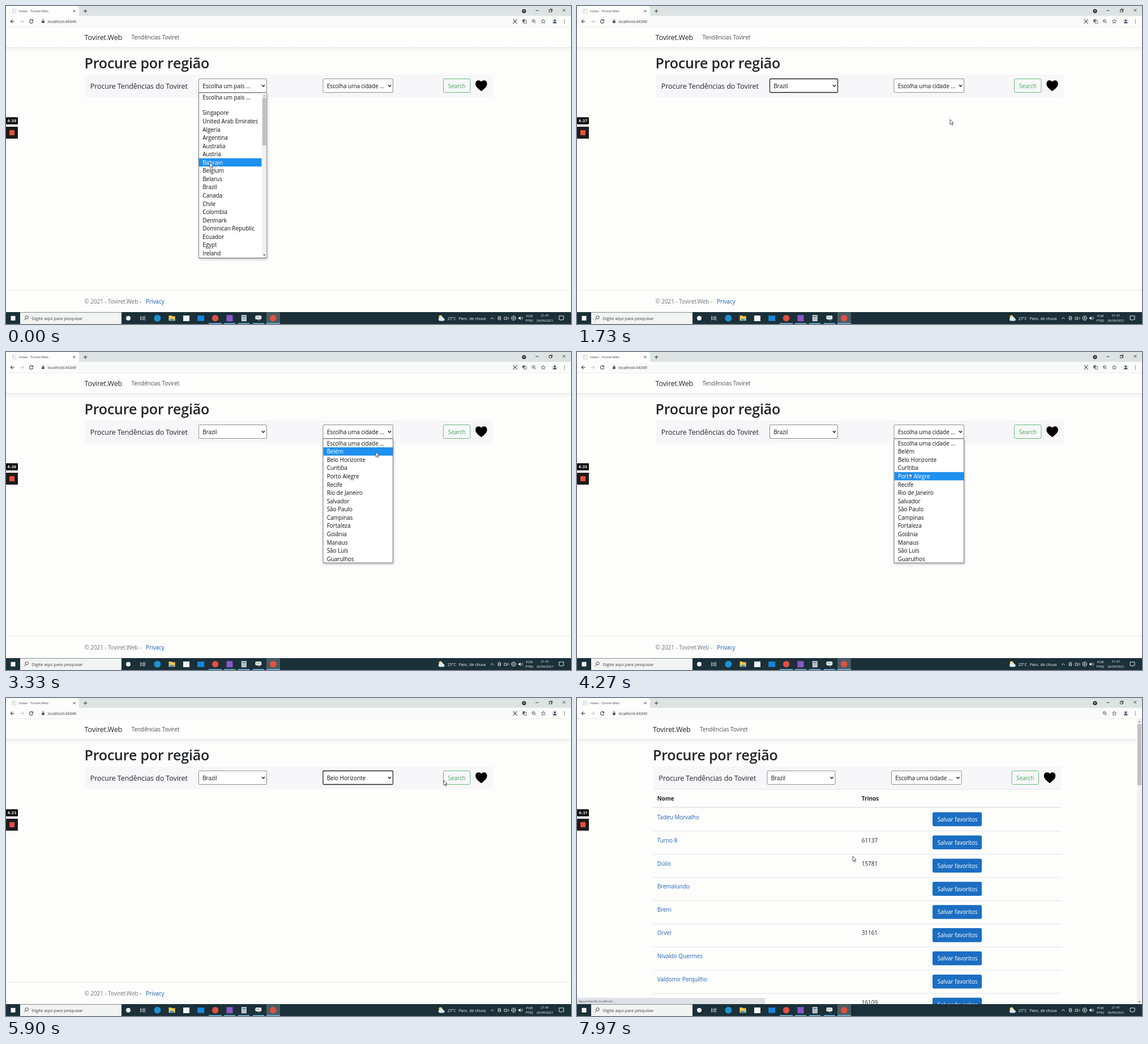
These frames come from a looping animation (998x561 px, 8000 ms). An HTML page:

```html
<!DOCTYPE html>
<html lang="pt">
<head>
<meta charset="utf-8">
<title>Tendências</title>
<style>
html, body { margin: 0; width: 100%; height: 100%; overflow: hidden; background: #fdfdfb; }
svg { display: block; width: 100%; height: 100%; }
text { font-family: "Open Sans", "Noto Sans", sans-serif; letter-spacing: -.007em; white-space: pre; }
</style>
</head>
<body>
<svg id="stage" viewBox="0 0 998 561"></svg>
<script>
const NS = 'http://www.w3.org/2000/svg';
const LOOP = 8000, ROW = 14.56;
const stage = document.getElementById('stage');

function el(parent, tag, attrs = {}, content) {
  const node = document.createElementNS(NS, tag);
  for (const k in attrs) node.setAttribute(k, attrs[k]);
  if (content !== undefined) node.textContent = content;
  parent.appendChild(node);
  return node;
}
const group = (p, attrs) => el(p, 'g', attrs);
const rect = (p, x, y, width, height, fill, more) => el(p, 'rect', { x, y, width, height, fill, ...more });
const circle = (p, cx, cy, r, fill, more) => el(p, 'circle', { cx, cy, r, fill, ...more });
const line = (p, d, stroke, w = 1, more) =>
  el(p, 'path', { d, stroke, fill: 'none', 'stroke-width': w, ...more });
const shape = (p, d, fill, more) => el(p, 'path', { d, fill, ...more });
const text = (p, x, y, s, size, fill = '#212529', more) =>
  el(p, 'text', { x, y, 'font-size': (size * .962).toFixed(2), fill, ...more }, s);
const show = (node, on) => node.setAttribute('display', on ? 'inline' : 'none');
const setText = (node, s) => { if (node.textContent !== s) node.textContent = s; };

// Soft shadows
const defs = el(stage, 'defs');
const blur = el(defs, 'filter', { id: 'blur', x: '-10%', y: '-10%', width: '120%', height: '120%' });
el(blur, 'feGaussianBlur', { stdDeviation: 2 });
const fade = el(defs, 'linearGradient', { id: 'fade', x2: 0, y2: 1 });
el(fade, 'stop', { offset: 0, 'stop-color': '#000', 'stop-opacity': .045 });
el(fade, 'stop', { offset: 1, 'stop-color': '#000', 'stop-opacity': 0 });

// Page
rect(stage, 0, 0, 998, 561, '#fdfdfb');
rect(stage, 0, 37, 998, 36, '#fefefd');
rect(stage, 0, 73, 998, 8, 'url(#fade)');
rect(stage, 0, 72.7, 998, .8, '#dfe2e7');
const page = group(stage);
text(page, 138.5, 60, 'Toviret.Web', 13);
text(page, 221.5, 59.3, 'Tendências Toviret', 10.4, '#4d4f52');
text(page, 138.5, 110, 'Procure por região', 26, '#212529', { 'font-weight': 600, style: 'letter-spacing:-.007em' });
rect(page, 139, 121, 721, 40, '#f7f7f9');
text(page, 148.8, 146, 'Procure Tendências do Toviret', 13);

function makeSelect(x, w) {
  const box = rect(page, x, 128.5, w, 24, '#fff', { rx: 1.5 });
  const label = text(page, x + 6.7, 144.8, '', 10.4, '#111');
  line(page, `M${x + w - 8.6} 139.2l2.6 2.8 2.6 -2.8`, '#111', 1.3);
  return (s, focus) => {
    setText(label, s);
    box.setAttribute('stroke', focus ? '#222' : '#8e8e8e');
    box.setAttribute('stroke-width', focus ? 1.3 : 1);
  };
}
const country = makeSelect(340.5, 120);
const city = makeSelect(560, 123.5);

const ring = rect(page, 771.3, 127.3, 50, 26.5, 'none', { rx: 3, stroke: '#28a745', 'stroke-opacity': .5, 'stroke-width': 2 });
const button = rect(page, 772.5, 128.5, 47.5, 24, '#28a745', { rx: 2.2, stroke: '#68bc78' });
const buttonText = text(page, 780.8, 144.8, 'Search', 10.4);
shape(page, 'M839.5 150.2C832 145 829.3 141.3 829.3 137C829.3 130.6 836.5 129.4 839.5 133.6C842.5 129.4 849.7 130.6 849.7 137C849.7 141.3 847 145 839.5 150.2Z', '#000');

// Footer of the empty page
const footer = group(stage);
rect(footer, 0, 500.7, 998, .8, '#e4e4d9');
text(footer, 138.5, 525.2, '© 2021 - Toviret.Web - ', 10.4, '#6c757d');
text(footer, 247, 525.2, 'Privacy', 10.4, '#1761b0');

// Result table
const table = group(stage);
rect(table, 134.5, 160.6, 721, .9, '#dee2e6');
rect(table, 134.5, 192.4, 721, 1.2, '#d9dde1');
text(table, 141.8, 181, 'Nome', 10.4, '#212529', { 'font-weight': 700 });
text(table, 502.8, 181, 'Trinos', 10.4, '#212529', { 'font-weight': 700 });
const results = [
  ['Tadeu Morvalho'], ['Turno 8', 61137], ['Dúlio', 15781], ['Bremalundo'], ['Brem'],
  ['Orvel', 31161], ['Nivaldo Quermes'], ['Valdomir Perquilho'], ['', 16109]
];
results.forEach(([name, count], i) => {
  const y = 193 + i * 40.9;
  if (i) rect(table, 134.5, y + .4, 721, .9, '#dee2e6');
  text(table, 141.8, y + 20.7, name, 10.4, '#2364b4');
  if (count) text(table, 502.8, y + 20.7, count, 10.4);
  rect(table, 628, y + 8.6, 87, 24.6, '#1b6ec2', { rx: 2.4 });
  text(table, 636.8, y + 24.8, 'Salvar favoritos', 10.4, '#fff');
});
rect(table, 989, 37, 9, 503, '#f1f1f1');
rect(table, 990, 46, 7, 108, '#c1c1c1');
shape(table, 'M991.5 43l2 -2.5 2 2.5Z', '#777');
shape(table, 'M991.5 535l2 2.5 2 -2.5Z', '#555');

// Drop-down lists
function makeList(x, w, bottom, barWidth, items) {
  const g = group(stage);
  rect(g, x + 1, 155, w, bottom - 153, '#000', { opacity: .28, filter: 'url(#blur)' });
  rect(g, x, 153, w, bottom - 153, '#fff', { stroke: '#777' });
  const mark = rect(g, x + .5, 0, w - 1 - barWidth, ROW, '#1e90ef');
  const rows = items.map(([s, y]) => ({ y, label: text(g, x + 6.7, y + 3.8, s, 10.4, '#111') }));
  g.update = cy => {
    const hot = rows.find(r => Math.abs(r.y - cy) <= ROW / 2) || rows[0];
    mark.setAttribute('y', hot.y - ROW / 2 - .1);
    rows.forEach(r => r.label.setAttribute('fill', r === hot ? '#fff' : '#111'));
  };
  return g;
}
const countries = ('Singapore,United Arab Emirates,Algeria,Argentina,Australia,Austria,Bahrain,Belgium,Belarus,' +
  'Brazil,Canada,Chile,Colombia,Denmark,Dominican Republic,Ecuador,Egypt,Ireland').split(',');
const cities = ('Escolha uma cidade ...,Belém,Belo Horizonte,Curitiba,Porto Alegre,Recife,Rio de Janeiro,Salvador,' +
  'São Paulo,Campinas,Fortaleza,Goiânia,Manaus,São Luís,Guarulhos').split(',');
const countryList = makeList(340.5, 120, 444.5, 8.5,
  [['Escolha um país ...', 161], ...countries.map((s, i) => [s, 188.6 + i * ROW])]);
rect(countryList, 452, 153.5, 8.3, 290.5, '#f1f1f1');
rect(countryList, 452.8, 162, 6.8, 84, '#c1c1c1');
shape(countryList, 'M454.2 159.5l2 -2.5 2 2.5Z', '#888');
shape(countryList, 'M454.2 438.2l2 2.5 2 -2.5Z', '#444');
const cityList = makeList(560, 123.5, 372, 0, cities.map((s, i) => [s, 161 + i * ROW]));

// Browser frame
const frame = group(stage);
rect(frame, 0, 0, 998, 18, '#dde3e3');
shape(frame, 'M0 18V0H125Q129 1 129 5V18Z', '#fdfdfb');
rect(frame, 0, 17.5, 998, 19, '#fdfdfb');
rect(frame, 56, 20, 902, 14.5, '#f9fafa', { rx: 7.2 });
rect(frame, 0, 36.3, 998, .8, '#e6e7e6');
const favicon = group(frame);
rect(favicon, 11.5, 5.5, 6, 7, '#fff', { stroke: '#c3c9d0', 'stroke-width': .8 });
line(favicon, 'M12.5 7.5h1.5M12.5 9.3h3', '#8fa6bd', .7);
const spinner = line(frame, 'M14 5.5A3.5 3.5 0 0 1 17.5 9', '#b9bec6', 1);
text(frame, 22.8, 11.2, 'Index - Toviret.Web', 6.24, '#4a4d51');
line(frame, 'M118.7 7.2l3.6 3.6M122.3 7.2l-3.6 3.6', '#333', 1);
line(frame, 'M137 9h6.4M140.2 5.8v6.4', '#333', 1);
circle(frame, 915, 9, 3.6, '#2b2d30');
shape(frame, 'M913.4 8h3.2l-1.6 2.2Z', '#fff');
line(frame, 'M935.5 8h5', '#222', .9);
line(frame, 'M959.5 6.5h4v4h-4ZM960.8 6.5v-1.2h4v4h-1.2', '#222', .8);
line(frame, 'M983.3 5l5 5M988.3 5l-5 5', '#222', .8);
line(frame, 'M14.6 27.2H8.4M11.3 24.2l-3 3 3 3', '#3c4043', 1.1);
line(frame, 'M24.8 27.2H31M28.1 24.2l3 3 -3 3', '#b9bcc0', 1);
const reload = group(frame);
line(reload, 'M47 25.2A3.1 3.1 0 1 0 47.6 28', '#3c4043', 1.1);
shape(reload, 'M48.2 23.4v3h-3Z', '#3c4043');
const stop = line(frame, 'M42 24.5l5.4 5.4M47.4 24.5l-5.4 5.4', '#3c4043', 1.1);
rect(frame, 63.2, 26.2, 4.6, 3.8, '#4a4d51', { rx: .4 });
line(frame, 'M64.2 26.3v-1.2a1.3 1.3 0 0 1 2.6 0v1.2', '#4a4d51', .8);
text(frame, 73.6, 29.6, 'localhost:44349', 7.28, '#3c4043');
const shareIcon = group(frame);
line(shareIcon, 'M896 25.5v-1.7h1.8M900.4 23.8h1.8v1.7M902.2 28.8v1.7h-1.8M897.8 30.5H896v-1.7', '#4a4d51', .9);
rect(shareIcon, 897.4, 25.3, 3.5, 3.7, '#6a6d71');
const langIcon = group(frame);
rect(langIcon, 912.3, 23.6, 4.6, 5.2, '#5f6368', { rx: .6 });
rect(langIcon, 915.3, 25.6, 4.2, 5, '#fdfdfd', { stroke: '#5f6368', 'stroke-width': .8 });
circle(frame, 931.8, 26.4, 2.5, 'none', { stroke: '#4a4d51', 'stroke-width': .9 });
line(frame, 'M933.6 28.2l2.3 2.4M930.6 26.4h2.4', '#4a4d51', .9);
line(frame, 'M949 23.5l1 2.4 2.6 .2 -2 1.7 .7 2.6 -2.3 -1.4 -2.3 1.4 .7 -2.6 -2 -1.7 2.6 -.2Z', '#4a4d51', .8);
circle(frame, 969.3, 27, 5.2, '#dfe3ea');
circle(frame, 969.3, 25.4, 1.6, '#34465f');
shape(frame, 'M966.1 30.2Q966.3 27.7 969.3 27.7Q972.3 27.7 972.5 30.2Z', '#34465f');
[24.4, 27.2, 30].forEach(y => circle(frame, 986.5, y, .75, '#3c4043'));

// Status bubble
const status = group(stage);
rect(status, 0, 529, 332, 12, '#dee1e6');
text(status, 2.6, 537, 'Aguardando localhost...', 6.24, '#4a4d51');

// Task bar
const bar = group(stage);
const white = '#f4f6f6';
rect(bar, 0, 540, 998, 21, '#1b3038');
rect(bar, 8.5, 546.8, 8, 8, white);
rect(bar, 25, 540.5, 179, 20.5, '#f2f3f3');
circle(bar, 36.6, 549.3, 2.7, 'none', { stroke: '#333', 'stroke-width': .9 });
line(bar, 'M34.7 551.4l-3 3.2', '#333', .9);
text(bar, 45.6, 553.5, 'Digite aqui para pesquisar', 7.8, '#444');
circle(bar, 216, 550.8, 4, white);
line(bar, 'M238 546.8v2M238 552.8v2M243 546.8v2M243 552.8v2M237.5 549.3h5.8v3h-5.8ZM245.4 547v7.6', white, .8);
circle(bar, 267.4, 550.8, 6, '#1c92d2');
shape(bar, 'M287.5 546h4.5l1.2 1.3h5.5v8h-11.2Z', '#f3c64e');
rect(bar, 289.8, 552, 6.6, 3.3, '#3f93d6');
rect(bar, 313, 546, 11, 10, white);
rect(bar, 338.2, 546.2, 12, 9.5, '#1787dc');
rect(bar, 460, 540.5, 24, 20.5, '#4a5c63');
circle(bar, 369.6, 550.8, 5.7, '#e2503f');
rect(bar, 389.5, 545.3, 11, 11, '#8a57c9');
rect(bar, 415.8, 545.2, 9, 11, '#cdd5d9');
rect(bar, 417.3, 547, 6, 2, '#5d7f96');
line(bar, 'M417.3 551h6M417.3 553.3h6', '#78878f', .8);
rect(bar, 440.3, 546, 11, 7, '#dfe5e7', { rx: 2 });
line(bar, 'M442 549h6M444 553l5 2.5', '#7d8b90', 1.2);
circle(bar, 471.8, 550.8, 5.7, '#e2503f');
[[358, 23], [385, 20], [410, 20], [436, 20], [460, 24]].forEach(([x, w]) => rect(bar, x, 559.4, w, 1.6, '#75b5df'));
circle(bar, 767.5, 548.5, 3, '#f1d46b');
shape(bar, 'M766 555.4a2.9 2.9 0 0 1 .4 -5.7a3.4 3.4 0 0 1 6.2 .7a2.6 2.6 0 0 1 .5 5Z', '#d8ecf6');
text(bar, 779.8, 553.5, '25°C', 7.2, white);
text(bar, 799.7, 553.5, 'Panc. de chuva', 7.2, white);
line(bar, 'M856.2 552.4l2.8 -2.8 2.8 2.8', white, .9);
line(bar, 'M869.5 548h4v5.5h-4ZM868.5 550.8h6M871.5 546.8v1', white, .8);
line(bar, 'M880 549h4.5v4H880ZM884.5 551h1.5M887 548.6l1.5 2.2 -1.5 2.2', white, .8);
circle(bar, 896.7, 550.6, 3.8, 'none', { stroke: white, 'stroke-width': .8 });
line(bar, 'M893 550.6h7.4M896.7 547v7.4', white, .7);
shape(bar, 'M905 549.4h1.6l2.2 -2v6.6l-2.2 -2h-1.6Z', white);
line(bar, 'M910 549.3q1 1.4 0 2.8M911.6 548q1.9 2.7 0 5.4', white, .7);
const mid = { 'text-anchor': 'middle' };
text(bar, 924.5, 548.6, 'POR', 6.2, white, mid);
text(bar, 924.5, 557.2, 'PTB2', 6.2, white, mid);
text(bar, 952, 548.3, '21:41', 6.1, white, mid);
text(bar, 952, 557.2, '26/09/2021', 6, white, mid);
line(bar, 'M977 546.8h8v6.4h-3l-1.3 1.8 -1.2 -1.8h-2.5Z', white, .9);

// Screen recorder
rect(stage, 0, 196.3, 21, 12.5, '#0c0c0c', { rx: 1 });
const timer = text(stage, 10.4, 204.9, '', 6.9, '#fff',
  { ...mid, 'font-weight': 700, style: 'font-family:Inter,sans-serif;letter-spacing:.03em' });
rect(stage, 0, 213, 21, 21, '#1b1b1b', { rx: 1 });
rect(stage, 6, 219, 9, 9, '#e8503a', { rx: .8 });

const pointer = shape(stage, 'M0 0V9L2.1 7.1L3.6 10.4L5 9.8L3.6 6.6H6.2Z', '#fff',
  { stroke: '#333', 'stroke-width': .8, 'stroke-linejoin': 'round' });

// Pointer stops: time, x, y
const stops = [
  [0, 360, 276], [700, 364, 319], [1000, 364, 319], [1730, 659, 200], [2300, 655, 144], [2650, 655, 144],
  [3180, 648, 188], [3330, 653, 176], [4270, 587, 213], [4750, 592, 191], [5150, 594, 190],
  [5900, 773, 145], [6150, 792, 143], [6500, 792, 143], [6870, 728, 191], [7970, 487, 279]
];
const clamp = v => Math.min(1, Math.max(0, v));
const ease = v => v * v * (3 - 2 * v);
function pointerAt(t) {
  let i = 0;
  while (i < stops.length - 2 && t > stops[i + 1][0]) i++;
  const [t0, x0, y0] = stops[i], [t1, x1, y1] = stops[i + 1];
  const k = ease(clamp((t - t0) / (t1 - t0)));
  return [x0 + (x1 - x0) * k, y0 + (y1 - y0) * k];
}

const PICK = 950, OPEN = 2500, CHOOSE = 5100, SUBMIT = 6350, LOADED = 7600;

function render(t) {
  const [x, y] = pointerAt(t);
  const loaded = t >= LOADED, loading = t >= SUBMIT && !loaded;
  pointer.setAttribute('transform', `translate(${x.toFixed(2)} ${y.toFixed(2)})`);
  page.setAttribute('transform', `translate(${loaded ? -4.5 : 0} 0)`);

  country(t < PICK ? 'Escolha um país ...' : 'Brazil', t >= PICK && t < OPEN);
  city(t >= CHOOSE && !loaded ? 'Belo Horizonte' : 'Escolha uma cidade ...', t >= CHOOSE && t < SUBMIT);
  show(countryList, t < PICK);
  show(cityList, t >= OPEN && t < CHOOSE);
  countryList.update(y);
  cityList.update(y);

  const hover = clamp((t - 5920) / 150) * (1 - clamp((t - 6795) / 150));
  const mix = (a, b) => Math.round(a + (b - a) * hover);
  button.setAttribute('fill-opacity', hover);
  buttonText.setAttribute('fill', `rgb(${mix(76, 255)},${mix(168, 255)},${mix(96, 255)})`);
  show(ring, loading);

  show(footer, !loaded);
  show(table, loaded);
  show(status, t >= SUBMIT);
  show(favicon, !loading);
  show(spinner, loading);
  spinner.setAttribute('transform', `rotate(${(-(t - 6870) * .36).toFixed(1)} 14 9)`);
  show(reload, !loading);
  show(stop, loading);
  show(shareIcon, t < SUBMIT);
  show(langIcon, !loaded);
  setText(timer, '4:' + (39 - Math.floor((t + 450) / 1000)));
}

let start;
function tick(now) {
  if (start === undefined) start = now;
  render((now - start) % LOOP);
  requestAnimationFrame(tick);
}
render(0);
requestAnimationFrame(tick);
</script>
</body>
</html>
```
